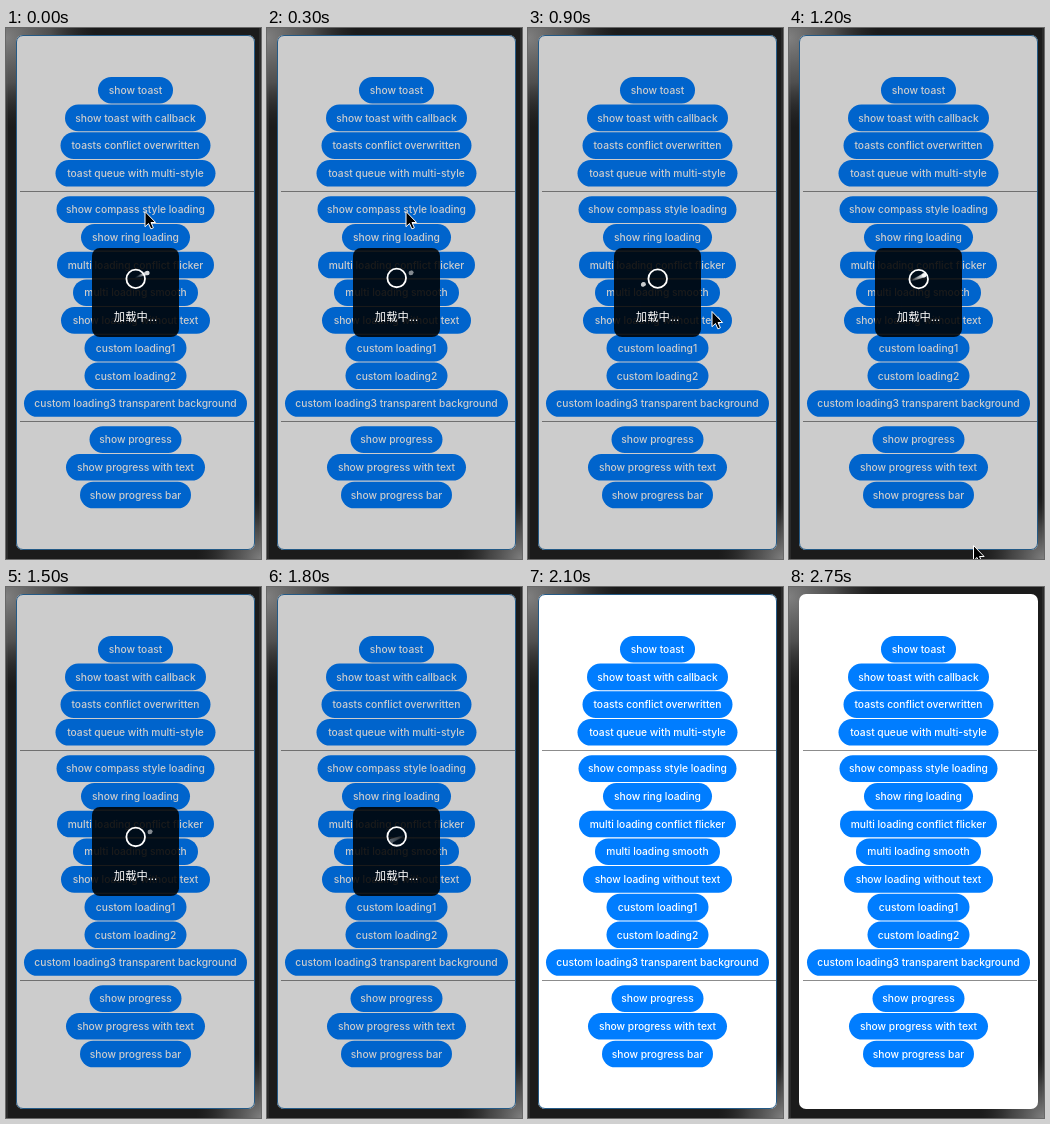
An HTML page that plays this animation: 255 px wide and 531 px high, repeating every 2.77 s.

```html
<!DOCTYPE html>
<html lang="en">
<head>
<meta charset="utf-8">
<style>
  html, body { margin: 0; width: 100%; height: 100%; overflow: hidden; background: #161616; }
  svg { display: block; width: 255px; height: 531px; }
  text { text-anchor: middle; fill: #fff; font: 500 10.25px Inter, sans-serif; }
  #dialog text { font: 500 11.3px "Noto Sans CJK SC", "Noto Sans CJK", sans-serif; }
</style>
</head>
<body>
<svg viewBox="0 0 255 531">
  <defs>
    <radialGradient id="topGlow" gradientUnits="userSpaceOnUse" cx="0" cy="10" r="90">
      <stop offset="0" stop-color="#808080"/>
      <stop offset=".5" stop-color="#606060" stop-opacity=".75"/>
      <stop offset="1" stop-color="#303030" stop-opacity="0"/>
    </radialGradient>
    <radialGradient id="bottomGlow" gradientUnits="userSpaceOnUse" cx="255" cy="531" r="65">
      <stop offset="0" stop-color="#808080"/>
      <stop offset=".5" stop-color="#606060" stop-opacity=".6"/>
      <stop offset="1" stop-color="#303030" stop-opacity="0"/>
    </radialGradient>
  </defs>

  <rect width="255" height="531" fill="#1b1b1b"/>
  <path d="M1 0V531M254 0V531" stroke="#2b2b2b" stroke-width="2"/>
  <rect width="255" height="531" fill="url(#topGlow)"/>
  <rect width="255" height="531" fill="url(#bottomGlow)"/>

  <rect x="10" y="7" width="239" height="515" rx="7" fill="#fff"/>
  <path d="M14 163.5H248M14 393.5H248" stroke="#8c8c8c"/>
  <g id="buttons"></g>
  <rect id="dim" x="10" y="7" width="239" height="515" rx="7"/>
  <rect id="outline" x="10.5" y="7.5" width="238" height="514" rx="6.5" fill="none" stroke="#245a86"/>

  <g id="dialog">
    <rect x="86" y="220" width="87" height="89" rx="8" fill-opacity=".87"/>
    <circle id="ring" cx="129.7" r="9.3" fill="none" stroke="#fff" stroke-width="1.8"/>
    <g id="comet" fill="#fff"></g>
    <text x="129.5" y="292.5">加载中...</text>
  </g>
  <path id="cursor" d="M0 0V15.2L3.5 12L5.9 17.4L8.4 16.3L6 11H10.6Z" stroke="#fff" stroke-linejoin="round"/>
</svg>
<script>
const $ = id => document.getElementById(id);

function add(parent, tag, attrs, label = '') {
  const node = document.createElementNS('http://www.w3.org/2000/svg', tag);
  set(node, attrs);
  node.textContent = label;
  return parent.appendChild(node);
}

function set(node, attrs) {
  for (const key in attrs) node.setAttribute(key, attrs[key]);
}

// Each group: first centre line, then label and pill width
const groups = [
  [62.2, [['show toast', 75], ['show toast with callback', 141],
    ['toasts conflict overwritten', 150], ['toast queue with multi-style', 160]]],
  [181.6, [['show compass style loading', 158], ['show ring loading', 109],
    ['multi loading conflict flicker', 157], ['multi loading smooth', 125],
    ['show loading without text', 149], ['custom loading1', 102],
    ['custom loading2', 102], ['custom loading3 transparent background', 223]]],
  [411.6, [['show progress', 92], ['show progress with text', 139], ['show progress bar', 111]]]
];
for (const [top, items] of groups) {
  items.forEach(([label, width], i) => {
    const y = top + i * 27.7;
    add($('buttons'), 'rect', { x: 129.5 - width / 2, y: y - 13.3, width, height: 26.6, rx: 13.3, fill: '#007dff' });
    add($('buttons'), 'text', { x: 129.5, y: y + 3.7 }, label);
  });
}

const LOOP = 2770, STEP = 150, TAIL = 18;
const dots = Array.from({ length: TAIL }, () => add($('comet'), 'circle', {}));

function drawSpinner(t) {
  const angle = (Math.max(t, 100) - 1425) / 1200 * 2 * Math.PI;
  set($('ring'), { cy: 250.3 - 0.9 * Math.sin(angle) });
  set($('comet'), { opacity: 0.65 - 0.35 * Math.sin(angle) });
  dots.forEach((dot, i) => {
    const fade = 1 - i / TAIL, a = angle - (1 - fade) * 0.95;
    const along = 16.4 * Math.cos(a), across = Math.sin(a);
    set(dot, {
      cx: 129.7 + 0.92 * along + 0.39 * across,
      cy: 250.6 - 0.39 * along + 0.92 * across,
      r: 0.7 + 1.5 * fade,
      opacity: i ? 0.45 * fade : 1
    });
  });
}

function cursorAt(t) {
  if (t < 900) return [139, 183.5];
  if (t < 1050) return [184, 283.5];
  if (t < 1200) return [189, 474.5];
  return t < 1350 ? [184.5, 517.5] : null;
}

function draw(now) {
  const time = now % LOOP, t = Math.floor(time / STEP) * STEP;
  const closing = t >= 1950, open = t < 2100;
  set($('dim'), { opacity: !open ? 0 : closing ? 0.145 : 0.2 });
  set($('outline'), { opacity: time < 2750 ? 1 : 0 });
  set($('dialog'), {
    opacity: !open ? 0 : closing ? 0.76 : 1,
    transform: `translate(129.5 264.5) scale(${closing ? 0.91 : 1}) translate(-129.5 -264.5)`
  });
  drawSpinner(t);
  const tip = cursorAt(t);
  set($('cursor'), { opacity: tip ? 1 : 0, transform: `translate(${tip || [0, 0]})` });
}

const start = performance.now();
(function tick() {
  draw(performance.now() - start);
  requestAnimationFrame(tick);
})();
</script>
</body>
</html>
```
